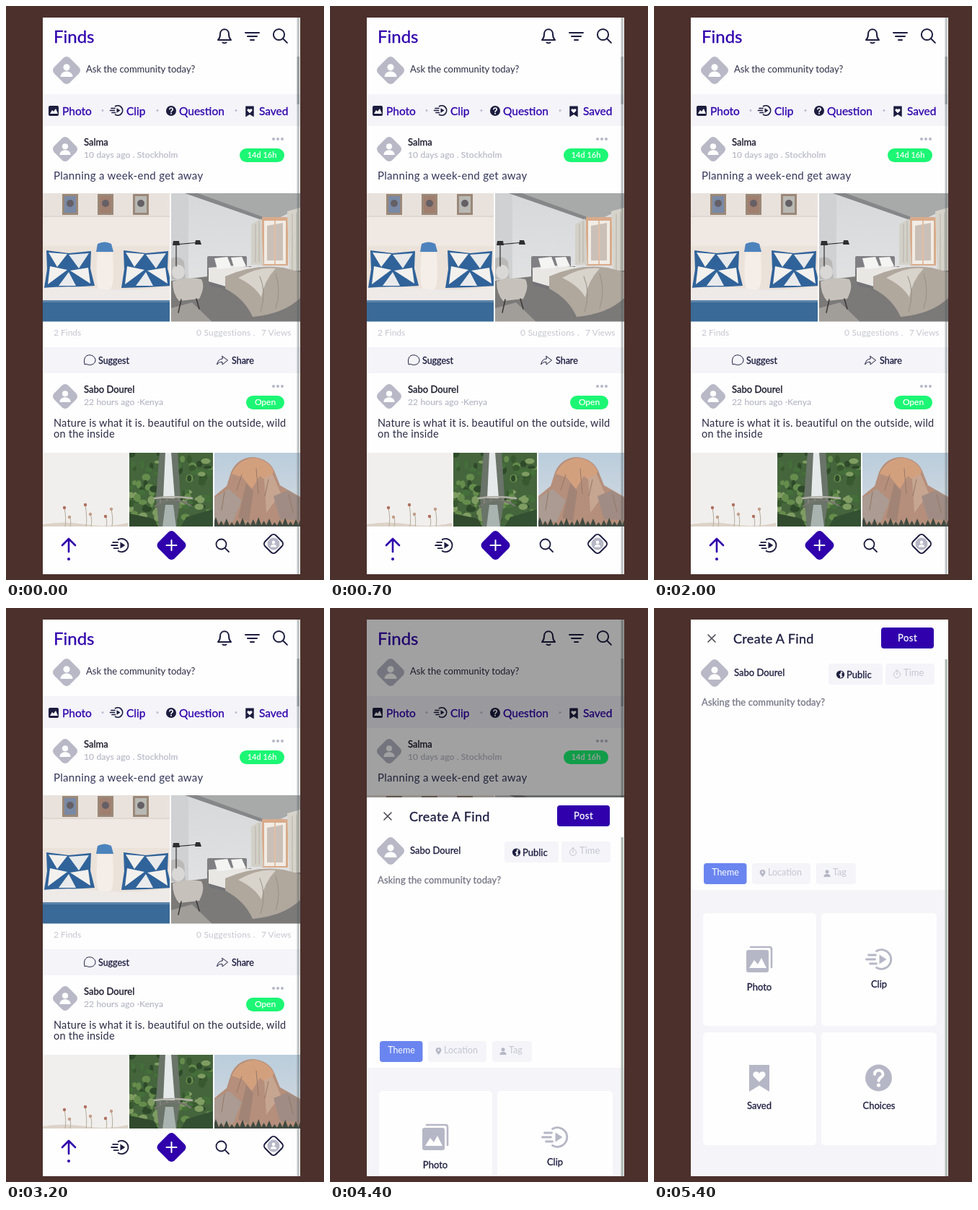
An HTML page for the animation above (8 s loop, 441x794 px).

```html
<!DOCTYPE html>
<html lang="en">
<head>
<meta charset="utf-8">
<title>Community feed</title>
<style>
  html, body { margin: 0; width: 100%; height: 100%; overflow: hidden; background: #4b302c; }
  svg { display: block; width: 441px; height: 794px; }
  text { font-family: Lato, "Open Sans", sans-serif; }
</style>
</head>
<body>
<svg id="stage" viewBox="0 0 441 794"></svg>
<script>
const INK = '#1d1d40', PURPLE = '#2f00ab', GREY = '#b6b7c6', PALE = '#f4f4f9', FAINT = '#c5c6d1',
      GREEN = '#1cf674', WHITE = '#fefefe', BLUE = '#30639a';

const rect = (x, y, w, h, fill, r = 0) =>
  `<rect x="${x}" y="${y}" width="${w}" height="${h}" rx="${r}" fill="${fill}"/>`;
const disc = (x, y, r, fill) => `<circle cx="${x}" cy="${y}" r="${r}" fill="${fill}"/>`;
const oval = (x, y, a, b, fill) => `<ellipse cx="${x}" cy="${y}" rx="${a}" ry="${b}" fill="${fill}"/>`;
const poly = (pts, fill) => `<polygon points="${pts}" fill="${fill}"/>`;
const shape = (d, fill) => `<path d="${d}" fill="${fill}"/>`;
const line = (d, color, w = 2) =>
  `<path d="${d}" fill="none" stroke="${color}" stroke-width="${w}" stroke-linecap="round" stroke-linejoin="round"/>`;
const at = (x, y, body, k = 1) => `<g transform="translate(${x} ${y}) scale(${k})">${body}</g>`;
const clip = (id, x, y, w, h, body) =>
  `<clipPath id="${id}">${rect(x, y, w, h, '#000')}</clipPath><g clip-path="url(#${id})">${body}</g>`;
const photo = (id, x, y, w, h, body) => clip(id, x, y, w, h, `<g filter="url(#soft)">${body}</g>`);
const fade = (id, from, to) =>
  `<linearGradient id="${id}" x2="0" y2="1"><stop stop-color="${from}"/><stop offset="1" stop-color="${to}"/></linearGradient>`;

// weight adds a thin outline for a medium cut
function text(x, y, size, str, fill, { weight = 0, gap = 0, mid = false } = {}) {
  return `<text x="${x}" y="${y}" font-size="${size}" fill="${fill}" stroke="${fill}" stroke-width="${weight}"` +
    ` letter-spacing="${gap}" text-anchor="${mid ? 'middle' : 'start'}">${str}</text>`;
}
const MED = { weight: 0.3 }, MID = { mid: true }, MEDMID = { weight: 0.3, mid: true };

function diamond(h, r, fill, extra = '') {
  const s = (h - r) / Math.SQRT2 + r;
  return `<rect x="${-s}" y="${-s}" width="${2 * s}" height="${2 * s}" rx="${r}" fill="${fill}" transform="rotate(45)" ${extra}/>`;
}
const person = (fill) => disc(0, -4.2, 4.6, fill) + shape('M-8.5 9C-8.5 -1 8.5 -1 8.5 9Z', fill);
const avatar = (x, y, h) => at(x, y, diamond(h, 6, '#b8b8c7') + at(0, 0, person(WHITE), h / 19));

const clipIcon = (c, w) =>
  line('M-7-11.5A13.4 13.4 0 1 1-7 11.5M-18-6H-8M-21 0H-9M-16 6H-7', c, w) + shape('M-3-6.5L7 0-3 6.5Z', c);
const search = (r, w) =>
  `<circle r="${r}" fill="none" stroke="${INK}" stroke-width="${w}"/>` +
  line(`M${r * .72} ${r * .72}L${r * 1.5} ${r * 1.5}`, INK, w);
const heart = (c) => shape('M0 7L-7 0C-11-5-4-10 0-4.5C4-10 11-5 7 0Z', c);
const bookmark = (c) => shape('M-14-18.5H14V18.5L0 10-14 18.5Z', c) + at(0, -2, heart(WHITE), 1.05);
const photoIcon = (c) =>
  rect(-18, -13, 31, 31, c, 3) + line('M-12-17H14Q17-17 17-14V11', c, 2.6) + shape('M-14 12L-7 1-2 7 3-2 10 12Z', WHITE);
const ask = (c) => disc(0, 0, 18.5, c) +
  line('M-5.5-5C-5.5-13 6.5-12 6-4.5C5.5-1 0-.5 0 4', WHITE, 4) + disc(0, 10, 2.6, WHITE);
const more = (y) => [371, 377, 383].map((x) => disc(x, y, 2, GREY)).join('');

function blueRoom() {
  const frame = (x, c) => rect(x, 260, 22, 29, '#9b8878') + rect(x + 3, 263, 16, 23, c) + disc(x + 11, 273, 5, '#655f66');
  const pillow = (x) => at(x, 338,
    poly('5,0 36,4 67,1 66,25 72,49 36,51 2,52 6,26', BLUE) +
    poly('8,3 34,5 20,23', '#f2f0ed') + poly('36,6 64,4 50,25', '#e7e9eb') +
    poly('10,22 34,27 7,47', '#f3f1ee') + poly('38,28 63,24 66,46', '#f3f1ee') +
    poly('22,49 36,30 46,49', '#e9eaec'));
  return rect(51, 259, 176, 178, '#e9e2dc') + rect(51, 292, 176, 40, '#efe8e3') + rect(51, 290, 176, 2, '#dfd7d0') +
    frame(78, '#7989a5') + frame(127, '#a07f6f') + frame(176, '#b9b9b4') +
    rect(51, 332, 176, 60, '#ebe2da') +
    shape('M127 341Q123 390 130 392H144Q151 390 148 341Z', '#f5eee8') +
    shape('M127 329Q137 324 146 329L149 340H125Z', '#4c83bd') +
    pillow(51) + pillow(158) +
    shape('M51 390Q90 386 130 391T227 388V412H51Z', '#eeeae7') +
    rect(51, 407, 176, 30, '#3a6a97') + rect(51, 407, 176, 3, '#5c84ab');
}

function greyRoom() {
  return rect(229, 259, 179, 178, 'url(#wall)') + rect(229, 259, 24, 120, '#cfd1d2') +
    poly('248,259 408,259 408,279 366,299', '#a8aaaa') + poly('248,259 266,259 368,296 366,300', '#858788') +
    rect(355, 292, 36, 67, '#d9ab8b') + rect(358, 297, 30, 60, '#f1ece5') +
    poly('362,304 384,300 384,352 362,352', '#cbc0b8') + rect(372, 297, 2, 60, '#e0bfa6') +
    poly('340,302 354,294 357,358 340,358', '#d3d0c8') + poly('390,284 408,279 408,372 393,370', '#d6d3ca') +
    line('M346 302V354M351 298V354M397 288V368M403 286V370', '#b5b2a9', 1) +
    poly('229,380 280,374 408,366 408,437 229,437', '#7b7a79') +
    poly('229,418 258,410 286,437 229,437', '#a19d99') +
    rect(279, 346, 55, 30, '#808084', 2) + poly('279,366 340,360 340,402 282,386', '#737377') +
    poly('281,362 318,359 380,365 350,401 281,381', '#e9e7e4') +
    shape('M289 349L307 347 313 362 293 364ZM312 348L327 347 333 360 316 361Z', '#f4f4f3') +
    shape('M304 374Q345 356 385 362L408 368V404Q385 426 342 430Q331 405 304 391Z', '#b0a79d') +
    shape('M322 376Q350 360 374 363Q358 380 354 403Q345 387 322 376Z', '#d8d3cb') +
    line('M352 374Q362 397 353 423M374 370Q382 395 374 418', '#988f85', 1) +
    shape('M229 349Q241 344 247 354L249 378H229Z', '#bab9b8') +
    shape('M231 381Q250 374 271 378Q277 388 268 405L240 408Q231 398 231 381Z', '#c6c1bb') +
    oval(239, 368, 9, 10, '#d9d8d6') + line('M243 406L239 424M264 405L268 419', '#3d3937', 1.5) +
    line('M236 328V360M234 330L268 327', '#2f2f31', 1.2) + shape('M232 325H240L241 331H231ZM263 324H269L271 330H262Z', '#2f2f31');
}

function meadow() {
  const stems = [[81, 694], [88, 707], [110, 690], [117, 703], [138, 706], [146, 696]];
  return rect(51, 617, 118, 104, '#f1efed') +
    shape('M51 717Q80 712 110 717T169 715V721H51Z', '#dcd2c7') +
    stems.map(([x, y], i) => line(`M${x} ${y}Q${x + 3} 710 ${x + 1} 720`, '#b3aa98', 1) +
      disc(x, y, 2.2, i % 2 ? '#c19d88' : '#b0705f')).join('');
}

function falls() {
  let seed = 7, leaves = '';
  const rnd = () => (seed = seed * 16807 % 2147483647) / 2147483647;
  const tones = ['#2e4a2a', '#456f3a', '#658c4c', '#38592f', '#7f9c62'];
  for (let i = 0; i < 110; i++) {
    const x = i % 2 ? 171 + rnd() * 44 : 236 + rnd() * 51;
    leaves += oval(x.toFixed(1), (619 + rnd() * 100).toFixed(1), 2 + rnd() * 5, 2 + rnd() * 4, tones[Math.floor(rnd() * 5)]);
  }
  return rect(171, 617, 116, 104, '#45653c') + leaves +
    poly('213,617 238,617 242,680 236,721 212,721 208,680', '#6a7469') +
    shape('M221 617H229L234 681H218Z', '#e6e9ea') + shape('M221 690H232L236 721H217Z', '#a9b4b0') +
    line('M207 692Q230 675 256 691', '#77766f', 2.5) + line('M206 681Q230 677 258 681', '#b3b1a8', 2.5) +
    line('M214 683V687M223 682V684M240 682V684M250 683V687', '#898980', 1.5) +
    poly('171,702 204,709 212,721 171,721', '#31492d') + poly('287,696 250,707 242,721 287,721', '#345032');
}

function peak() {
  let trees = '';
  for (let i = 0; i < 17; i++) {
    const x = 286 + i * 7.4, top = 707 + (i * 5) % 8;
    trees += poly(`${x},721 ${x + 5},${top} ${x + 10},721`, '#3f4a40');
  }
  return rect(289, 617, 119, 104, 'url(#sky)') +
    shape('M289 678L306 664 312 645Q321 624 344 624Q365 627 372 643L380 663 408 679V721H289Z', '#b58f7b') +
    shape('M313 647Q322 627 344 625Q364 628 371 643L366 661 352 650 341 668 328 652Z', '#d3a07e') +
    poly('289,680 309,668 327,684 315,713 289,715', '#ab9b92') +
    poly('333,660 343,671 337,713 322,708', '#a28476') +
    poly('358,653 370,648 381,674 361,701', '#c6a591') +
    poly('371,678 391,670 408,681 408,711 380,710', '#a08c84') +
    line('M327 648L320 670M347 640L350 675M364 655L359 678M303 672L299 697M392 676L398 700', '#957868', 1) +
    trees;
}

function post(y, name, when, pillX, pill, size) {
  const w = 386 - pillX;
  return avatar(82, y, 17) + text(108, y - 5, 13, name, '#151528', MED) +
    text(108, y + 12, 12, when, GREY, { weight: 0.2, gap: 0.15 }) + more(y - 14) +
    rect(pillX, y - 1, w, 19, GREEN, 9.5) + text(pillX + w / 2, y + 12, size, pill, WHITE, { weight: 0.2, mid: true });
}

function feed() {
  const tab = (x, s) => text(x, 151, 15.5, s, PURPLE, MED);
  const bell = line('M-9 6Q-6 3-6-2C-6-11 6-11 6-2Q6 3 9 6ZM-2.5 9.5Q0 11 2.5 9.5', INK, 2);
  return rect(51, 16, 357, 770, WHITE) +
    text(66, 51, 24, 'Finds', PURPLE, MED) +
    at(303, 41, bell) + line('M332 37H351M335 42H348M339 47H344', INK, 2) + at(378.5, 39.5, search(7.6, 2)) +
    avatar(84, 89, 19) + text(111, 92, 13, 'Ask the community today?', '#2b2b45') +
    rect(51, 122, 357, 44, PALE) +
    at(66, 145, rect(-7, -7, 14, 14, INK, 2) + shape('M-5 4L-2-1 0 1 3-3 6 4Z', WHITE)) +
    at(155, 144.5, clipIcon(INK, 3.4), 0.5) + at(229, 145, ask(INK), 0.38) + at(338, 146, bookmark(INK), 0.41) +
    tab(78, 'Photo') + tab(167, 'Clip') + tab(240, 'Question') + tab(351, 'Saved') +
    [134, 210, 319].map((x) => disc(x, 144.5, 1.5, '#bdbdd0')).join('') +
    post(198, 'Salma', '10 days ago . Stockholm', 324, '14d 16h', 11) +
    text(66, 240, 15, 'Planning a week-end get away', '#34365a', { gap: 0.3 }) +
    photo('roomA', 51, 259, 176, 177.5, blueRoom()) + photo('roomB', 229, 259, 179, 177.5, greyRoom()) +
    text(66, 456, 12, '2 Finds', FAINT) + text(264, 456, 12, '0 Suggestions .', FAINT, { gap: 0.2 }) +
    text(354, 456, 12, '7 Views', FAINT) +
    rect(51, 472, 357, 36, PALE) +
    line('M109 495.5C105 478 124 481 124 490C124 496 116 498 112 495.5Z', INK, 1) +
    line('M300 484.5L307.5 490 300 496V492.5Q295 492 292.5 496Q294 488 300 488Z', INK, 1) +
    text(128, 495, 12.5, 'Suggest', INK, MED) + text(313, 495, 12.5, 'Share', INK, MED) +
    post(540, 'Sabo Dourel', '22 hours ago ·Kenya', 333, 'Open', 12) +
    text(66, 582, 14.5, 'Nature is what it is. beautiful on the outside, wild', '#2b2b45', { gap: 0.23 }) +
    text(66, 597, 14.5, 'on the inside', '#2b2b45', { gap: 0.23 }) +
    photo('picA', 51, 618, 118, 102, meadow()) + photo('picB', 171, 618, 116, 102, falls()) +
    photo('picC', 289, 618, 119, 102, peak()) +
    rect(51, 720, 357, 66, WHITE) +
    line('M87 755V738M78 746L87 737 96 746', PURPLE, 2.6) + disc(87, 765, 2, PURPLE) +
    at(160.5, 746, clipIcon(INK, 2.8), 0.68) +
    at(229.5, 746, diamond(20, 6, PURPLE) + line('M-7 0H7M0-7V7', WHITE, 2)) +
    at(298.5, 744.5, search(7, 1.8)) +
    at(371, 744, diamond(13, 5, WHITE, `stroke="${INK}" stroke-width="2"`) + disc(0, 0, 8.5, GREY) + at(0, 0, person(WHITE), 0.5)) +
    `<g opacity=".34">${rect(403.5, 16, 3.5, 770, '#4f5a58')}</g><g opacity=".3">${rect(403.5, 70, 3.5, 66, '#3b4040')}</g>`;
}

function card(x, y, icon, label, labelY) {
  return rect(x, y, x < 100 ? 157 : 160, 156, WHITE, 5) + icon +
    text(x < 100 ? 146 : 312, labelY, 13, label, INK, MEDMID);
}

function sheet() {
  const watch = `<circle cy="1" r="4.5" fill="none" stroke="${FAINT}"/>` + line('M-1.5-5H1.5M0 1V-1.5', FAINT, 1.2);
  const globe = `<circle r="5" fill="${WHITE}" stroke="${INK}" stroke-width="1.2"/>` +
    shape('M-5-1Q-3-5 1-5L0-1-2 0 0 2-1 5Q-5 3-5-1ZM2-3L5-1 4 3 2 2Z', INK);
  const pin = shape('M0 5C-7-2-3-5 0-5S7-2 0 5Z', GREY) + disc(0, -1.5, 1.3, PALE);
  return rect(51, 16, 357, 770, WHITE) +
    line('M75 37L85 47M85 37L75 47', '#4b4b56', 1.6) +
    text(110, 49, 18, 'Create A Find', INK, { weight: 0.3, gap: 0.35 }) +
    rect(315, 27, 73, 29, PURPLE, 4) + text(351.5, 46, 13, 'Post', WHITE, { weight: 0.3, gap: 0.5, mid: true }) +
    avatar(84, 90, 19) + text(111, 94, 13, 'Sabo Dourel', INK, MED) +
    rect(242, 77, 75, 29, PALE, 4) + at(258.5, 92, globe) + text(267, 97, 13, 'Public', INK, MED) +
    rect(321, 77, 68, 29, PALE, 4) + at(337, 91, watch) + text(346, 94, 13, 'Time', FAINT) +
    text(66, 135, 13, 'Asking the community today?', '#777887', { weight: 0.3, gap: 0.1 }) +
    rect(69, 353, 59.5, 29, '#6a85ef', 4) + text(99, 370, 12.5, 'Theme', WHITE, MID) +
    rect(136, 353, 81, 29, PALE, 4) + at(150.5, 367, pin) + text(158, 370, 12.5, 'Location', FAINT) +
    rect(225, 353, 55, 29, PALE, 4) + at(240, 367, person(GREY), 0.55) + text(248, 370, 12.5, 'Tag', FAINT) +
    rect(51, 390, 357, 396, PALE) +
    card(68, 422, at(146, 486, photoIcon(GREY)), 'Photo', 529) +
    card(232, 422, at(315.5, 486, clipIcon(GREY, 2.8)), 'Clip', 525) +
    card(68, 587, at(146, 650.5, bookmark(GREY)), 'Saved', 693) +
    card(232, 587, at(311.5, 650, ask(GREY)), 'Choices', 693) +
    rect(403.5, 71, 3.5, 715, '#b3bdb6');
}

const stage = document.getElementById('stage');
stage.innerHTML =
  `<defs><filter id="soft"><feGaussianBlur stdDeviation=".7"/></filter>` +
  fade('wall', '#d6d8da', '#e6e6e6') + fade('sky', '#bacddc', '#d6dbe0') + '</defs>' +
  clip('phone', 51, 16, 357, 770,
    feed() + `<rect id="shade" x="51" y="16" width="357" height="770"/><g id="sheet">${sheet()}</g>`);
const shade = document.getElementById('shade'), panel = document.getElementById('sheet');

const LOOP = 8000, STEP = 100, OPEN = 4266, RISE = 540, HEIGHT = 770;
const begin = performance.now();

function draw() {
  const t = Math.floor((performance.now() - begin) % LOOP / STEP) * STEP;
  const u = Math.min(1, Math.max(0, (t - OPEN) / RISE));
  const left = (1 - u) ** 4;
  panel.setAttribute('transform', `translate(0 ${Math.round(HEIGHT * left)})`);
  shade.setAttribute('opacity', 0.54 * (1 - left));
  requestAnimationFrame(draw);
}
draw();
</script>
</body>
</html>
```
